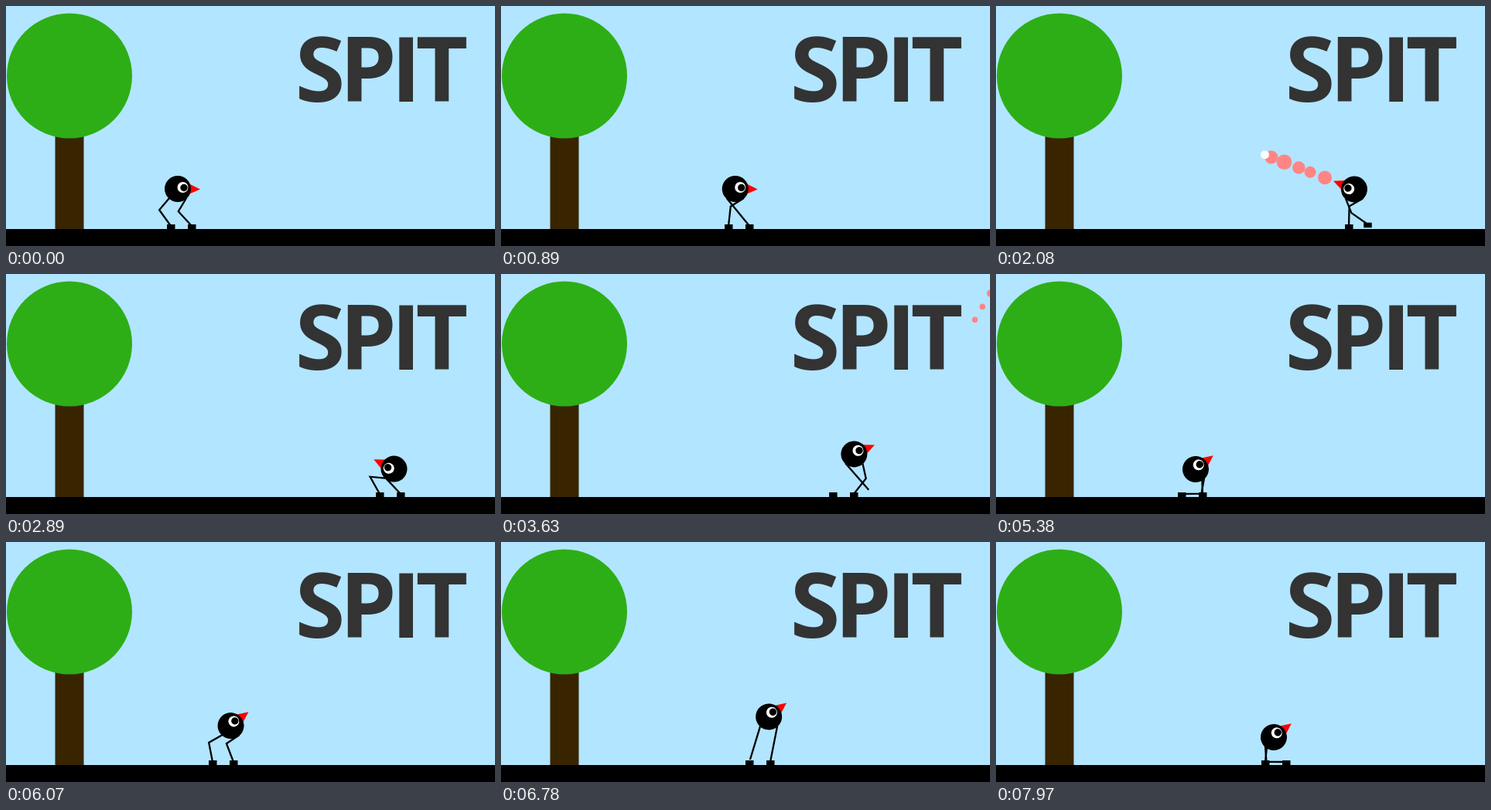
Recreate the animation shown at these times as an HTML page with a canvas. Size 632 by 311 pixels, loop 8 s.

```html
<!DOCTYPE html>
<html lang="en">
<head>
<meta charset="utf-8">
<title>Walking bird</title>
<style>
  html, body { margin: 0; width: 100%; height: 100%; overflow: hidden; background: #b2e5ff; }
  canvas { display: block; }
</style>
</head>
<body>
<canvas id="stage" width="632" height="311"></canvas>
<script>
const ctx = document.getElementById('stage').getContext('2d');
const LOOP = 8000;
const START_X = 222, STAND_Y = 237;
const STRIDE = 27, FIRST_FOOT = 213, ANKLE_Y = 285;
const THIGH = 20, SHIN = 25.5;
const CROUCH_PERIOD = 2590, TURN_TIME = 250;
const SHOT_SPEED = 0.807, DROP_LIFE = 296, DROP_GAP = 18;

// Times in ms, speeds in pixels per ms, angles in degrees.
const WALKS = [
  { start: 419, end: 1828, speed: 0.171 },
  { start: 2650, end: 2900, speed: 0.16 },
  { start: 3340, end: 4871, speed: -0.16 },
  { start: 5655, end: 6945, speed: 0.0783 }
];
const AIMS = [
  { at: 1960, angle: -159, fires: true },
  { at: 3115, angle: -60, fires: true },
  { at: 3630, angle: -25 },
  { at: 4305, angle: -29, fires: true },
  { at: 5380, angle: -39 }
];

const radians = degrees => degrees * Math.PI / 180;
const clamp = (v, low = 0, high = 1) => Math.max(low, Math.min(high, v));
const smooth = p => p * p * (3 - 2 * p);

function random(seed) {
  const v = Math.sin(seed * 12.9898) * 43758.5453;
  return v - Math.floor(v);
}

function bodyX(t) {
  return WALKS.reduce((x, { start, end, speed }) => x + speed * (clamp(t, start, end) - start), START_X);
}

// The bird stands still at first, then bobs between stretched and crouched.
function bodyY(t) {
  if (t < 2060) return STAND_Y;
  return 239.5 + 13.5 * Math.cos(2 * Math.PI * (t - 5380) / CROUCH_PERIOD);
}

function headAngle(t) {
  return AIMS.reduce((angle, aim) =>
    angle + (aim.angle - angle) * smooth(clamp(1 + (t - aim.at) / TURN_TIME)), 0);
}

function disc(x, y, r, color) {
  ctx.fillStyle = color;
  ctx.beginPath();
  ctx.arc(x, y, r, 0, Math.PI * 2);
  ctx.fill();
}

function box(x, y, w, h, color) {
  ctx.fillStyle = color;
  ctx.fillRect(x, y, w, h);
}

function drawScene() {
  box(0, 0, 632, 311, '#b2e5ff');
  box(63.5, 160, 37, 130, '#382500');
  disc(82, 90.5, 81, '#2dae17');
  ctx.fillStyle = '#333';
  ctx.font = 'bold 117px "Open Sans", "Noto Sans", sans-serif';
  ctx.letterSpacing = '-7px';
  ctx.textAlign = 'center';
  ctx.fillText('SPIT', 482, 124);
}

function drawShot({ at, angle }, t) {
  if (t < at) return;
  const dx = Math.cos(radians(angle)), dy = Math.sin(radians(angle));
  const x = bodyX(at) + 26 * dx, y = bodyY(at) + 26 * dy;
  const reach = (t - at) * SHOT_SPEED;
  for (let i = 0; i < 32; i++) {
    const seed = at + i;
    const d = 12 + DROP_GAP * i + 6 * random(seed);
    const age = (reach - d) / SHOT_SPEED / DROP_LIFE;
    if (age < 0 || age >= 1) continue;
    const radius = 8 + 4 * random(seed + 0.5);
    disc(x + dx * d, y + dy * d, radius * Math.pow(1 - age, 0.4), '#ff8585');
  }
  disc(x + dx * reach, y + dy * reach, 5.5, '#fff');
}

// Feet land on a fixed grid; the trailing one swings two strides past the other.
function placeFeet(x, goingLeft) {
  const offset = goingLeft ? x - FIRST_FOOT : x - START_X;
  const step = goingLeft ? Math.ceil(offset / STRIDE) - 1 : Math.floor(offset / STRIDE);
  const inStep = offset - step * STRIDE;
  const travelled = goingLeft ? STRIDE - inStep : inStep;
  const swing = Math.sin(clamp((travelled - 17) / 10) * Math.PI / 2);
  const low = FIRST_FOOT + step * STRIDE, high = low + STRIDE;
  const lift = 14 * Math.sin(Math.PI * swing);
  const pair = goingLeft
    ? [{ x: low, lift: 0 }, { x: high - 2 * STRIDE * swing, lift }]
    : [{ x: low + 2 * STRIDE * swing, lift }, { x: high, lift: 0 }];
  return step % 2 ? pair.reverse() : pair;
}

function drawLeg(hipX, hipY, foot, goingLeft, x) {
  let dx = foot.x - hipX, dy = ANKLE_Y - foot.lift - hipY;
  // A leg stretched far behind flips straight to the other side.
  const flipped = goingLeft && foot.x < x - 20;
  if (flipped) dx = dy * 0.87;
  const length = Math.hypot(dx, dy);
  const d = flipped ? THIGH + SHIN : Math.min(length, THIGH + SHIN);
  dx /= length;
  dy /= length;
  const along = (THIGH * THIGH - SHIN * SHIN + d * d) / (2 * d);
  const side = Math.sqrt(Math.max(0, THIGH * THIGH - along * along)) * (goingLeft ? -1 : 1);
  ctx.beginPath();
  ctx.moveTo(hipX, hipY);
  ctx.lineTo(hipX + dx * along - dy * side, hipY + dy * along + dx * side);
  ctx.lineTo(hipX + dx * d, hipY + dy * d);
  ctx.stroke();
  box(foot.x - 5, 283 - foot.lift, 10.5, 6.5, '#000');
}

function drawBird(t) {
  const x = bodyX(t), y = bodyY(t);
  const goingLeft = WALKS.filter(walk => walk.start <= t).pop()?.speed < 0;
  const [left, right] = placeFeet(x, goingLeft);
  ctx.strokeStyle = '#000';
  ctx.lineWidth = 2.3;
  drawLeg(x - 11, y + 12, left, goingLeft, x);
  drawLeg(x + 11, y + 12, right, goingLeft, x);

  ctx.save();
  ctx.translate(x, y);
  ctx.rotate(radians(headAngle(t)));
  ctx.fillStyle = '#f00';
  ctx.beginPath();
  ctx.moveTo(14, -7);
  ctx.lineTo(29, 0.5);
  ctx.lineTo(14, 7);
  ctx.fill();
  disc(0, 0, 17, '#000');
  disc(6.5, -2, 7, '#fff');
  disc(8, -1.5, 4.7, '#000');
  ctx.restore();
}

function frame(now) {
  const t = now % LOOP;
  drawScene();
  AIMS.filter(aim => aim.fires).forEach(aim => drawShot(aim, t));
  drawBird(t);
  box(0, 289, 632, 22, '#000');
  requestAnimationFrame(frame);
}
requestAnimationFrame(frame);
</script>
</body>
</html>
```
